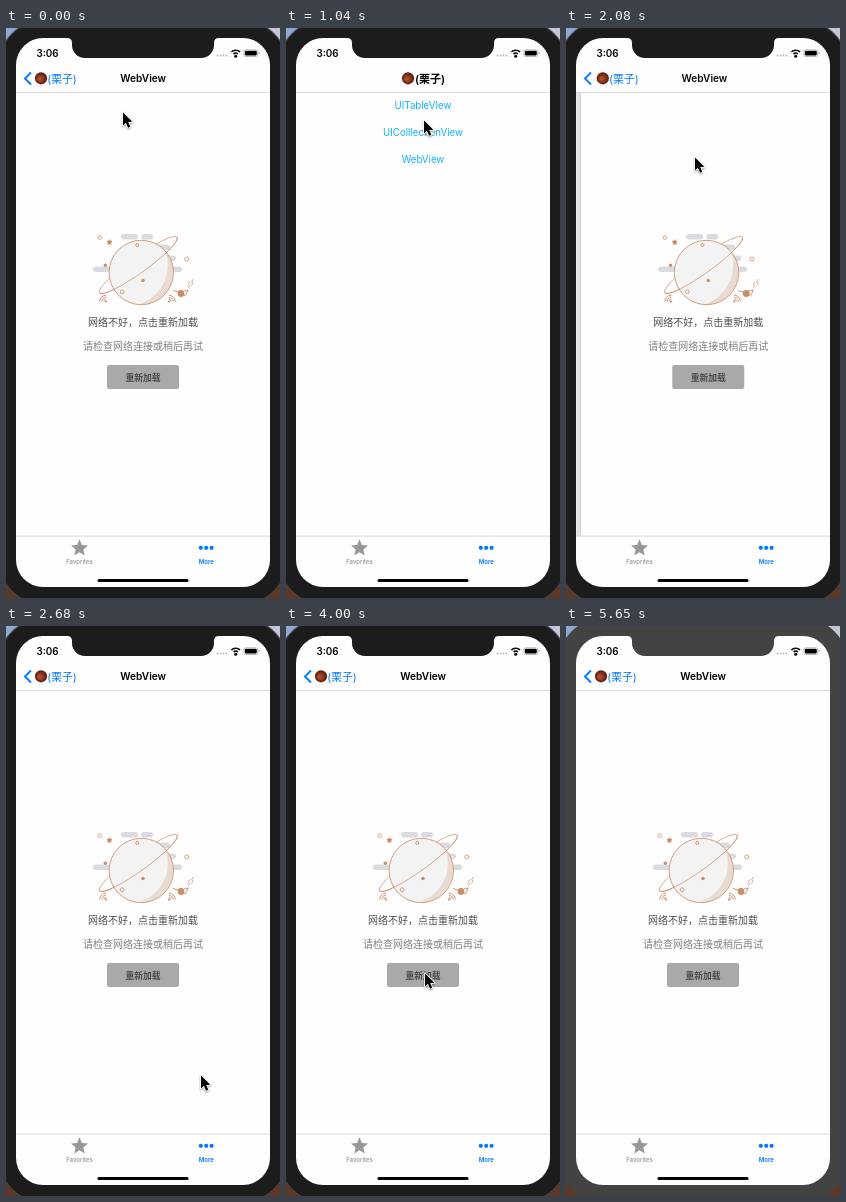
An HTML page with a canvas for the animation above (5750 ms loop, 274 px wide and 570 px high).

```html
<!DOCTYPE html>
<html lang="zh">
<head>
<meta charset="utf-8">
<title>WebView navigation</title>
<style>
html, body { margin: 0; width: 274px; height: 570px; overflow: hidden; background: #1c1c1c; }
canvas { display: block; width: 274px; height: 570px; }
</style>
</head>
<body>
<canvas id="stage"></canvas>
<script>
const W = 274, H = 570, LOOP = 5750, STEP = 148.1;
const LEFT = 10, RIGHT = 264, TOP = 10, BOTTOM = 559, WIDE = RIGHT - LEFT;
const NAV = 64, TAB = 508;
const POP = 620, PUSH = 1760, POINTER_GONE = 5190, UNFOCUS = 5650;
const BLUE = '#007aff', COPPER = '#c98d68', CLOUD = '#dadbde', LINE = '#dadadb';
const CJK = '"Noto Sans CJK SC", "Noto Sans CJK", sans-serif';
const SANS = 'Inter, ' + CJK;

const canvas = document.getElementById('stage');
const ctx = canvas.getContext('2d');
const dpr = window.devicePixelRatio || 1;
canvas.width = W * dpr;
canvas.height = H * dpr;

// Pointer stops: time, x, y
const PATH = [
  [0, 117, 84], [440, 36, 51], [POP, 36, 51], [1036, 138, 92], [1332, 129, 128], [2080, 129, 129],
  [2665, 195, 449], [3110, 235, 531], [3998, 139, 347]
];

const mix = (a, b, k) => a + (b - a) * k;
const smooth = k => k * k * (3 - 2 * k);

function spring(ms) {
  const x = Math.max(0, ms) * 0.0185;
  return 1 - (1 + x) * Math.exp(-x);
}

// 1 = detail page fully shown, 0 = list fully shown
function detailShown(t) {
  const p = t < PUSH ? 1 - spring(t - POP) : spring(t - PUSH);
  return p < 0.01 ? 0 : p > 0.99 ? 1 : p;
}

function pointerAt(t) {
  const i = PATH.findIndex(stop => stop[0] > t);
  if (i < 0) return PATH.at(-1).slice(1);
  const [t0, x0, y0] = PATH[i - 1], [t1, x1, y1] = PATH[i];
  const k = smooth((t - t0) / (t1 - t0));
  return [mix(x0, x1, k), mix(y0, y1, k)];
}

function text(str, x, y, size, color, weight = 400, align = 'center', family = SANS) {
  ctx.font = `${weight} ${size}px ${family}`;
  ctx.textAlign = align;
  ctx.fillStyle = color;
  ctx.fillText(str, x, y);
}

function box(x, y, w, h, r, color) {
  ctx.beginPath();
  ctx.roundRect(x, y, w, h, r);
  ctx.fillStyle = color;
  ctx.fill();
}

function stroke(color, width) {
  ctx.strokeStyle = color;
  ctx.lineWidth = width;
  ctx.stroke();
}

function dot(x, y, r, color) {
  ctx.beginPath();
  ctx.arc(x, y, r, 0, 7);
  ctx.fillStyle = color;
  ctx.fill();
}

function ring(x, y, r) {
  ctx.beginPath();
  ctx.arc(x, y, r, 0, 7);
  stroke(COPPER, 0.8);
}

function line(points, color, width) {
  ctx.beginPath();
  points.forEach(p => ctx.lineTo(...p));
  stroke(color, width);
}

function star(x, y, r, inner, color) {
  ctx.beginPath();
  for (let i = 0; i < 10; i++) {
    const a = -Math.PI / 2 + i * Math.PI / 5, d = i % 2 ? r * inner : r;
    ctx.lineTo(x + d * Math.cos(a), y + d * Math.sin(a));
  }
  ctx.closePath();
  ctx.fillStyle = color;
  ctx.fill();
}

// Dot with arcs opening towards an angle
function signal(x, y, angle, gap, arcs, color, width) {
  dot(x, y, gap / 2, color);
  for (let i = 1; i <= arcs; i++) {
    ctx.beginPath();
    ctx.arc(x, y, i * gap, angle - 0.8, angle + 0.8);
    stroke(color, width);
  }
}

function withAlpha(alpha, paint) {
  ctx.save();
  ctx.globalAlpha = alpha;
  paint();
  ctx.restore();
}

function gradient(x0, y0, x1, y1, ...colors) {
  const g = ctx.createLinearGradient(x0, y0, x1, y1);
  colors.forEach((c, i) => g.addColorStop(i / (colors.length - 1), c));
  return g;
}

function phone(bezel) {
  ctx.fillStyle = gradient(0, 0, W, 0, '#8fa7d4', '#c6c6d8');
  ctx.fillRect(0, 0, W, H / 2);
  ctx.fillStyle = '#5f3823';
  ctx.fillRect(0, H / 2, W, H / 2);
  box(-7, -7, W + 14, H + 13, 44, bezel);
  stroke('#454547', 1.2);
  box(LEFT, TOP, WIDE, BOTTOM - TOP, 27, '#fefefe');
}

function notch(bezel) {
  ctx.beginPath();
  ctx.moveTo(61, 9);
  ctx.lineTo(61, 10);
  ctx.quadraticCurveTo(66, 10, 66, 15);
  ctx.arcTo(66, 30, 78, 30, 13);
  ctx.arcTo(208, 30, 208, 15, 13);
  ctx.lineTo(208, 15);
  ctx.quadraticCurveTo(208, 10, 213, 10);
  ctx.lineTo(213, 9);
  ctx.fillStyle = bezel;
  ctx.fill();
}

function statusBar() {
  text('3:06', 41.5, 29, 9.8, '#000', 600);
  for (let i = 0; i < 4; i++) dot(211.5 + i * 3, 27.5, 0.9, '#b9b9b9');
  signal(229.7, 28.2, -Math.PI / 2, 3, 2, '#000', 1.6);
  box(237.5, 21.5, 14.6, 7.2, 2.2, '#a0a0a0');
  box(238.1, 22.1, 13.4, 6, 1.7, '#fff');
  box(238.8, 22.8, 12, 4.6, 1.1, '#000');
  box(252.6, 23.9, 1, 2.4, 0.5, '#9a9a9a');
}

function chestnut(x, y) {
  const g = ctx.createRadialGradient(x - 1.5, y + 1, 0.5, x, y, 6.4);
  ['#b4512f', '#8a351d', '#481a10'].forEach((c, i) => g.addColorStop(i / 2, c));
  dot(x, y, 6.1, g);
}

function navBar(p) {
  const back = -87 * p;
  withAlpha(p * p, () => {
    line([[25, 44.5], [19, 50.5], [25, 56.5]], BLUE, 1.9);
    text('WebView', 137.2 + 60 * (1 - p), 54.3, 10.1, '#000', 600);
    text('(栗子)', 128.3 + back, 54.5, 10.8, BLUE, 400, 'left');
  });
  withAlpha(1 - p * p, () => text('(栗子)', 129 + back, 54.5, 11, '#000', 600, 'left'));
  chestnut(122 + back, 50.3);
  ctx.fillStyle = LINE;
  ctx.fillRect(LEFT, NAV, WIDE, 1);
}

function listPage() {
  ['UITableVIew', 'UIColllectionView', 'WebView'].forEach((name, i) =>
    text(name, 137, 81 + i * 27, 9.7, '#0fb0fb'));
}

function orbit(to) {
  ctx.beginPath();
  ctx.ellipse(132.3, 237, 47.8, 8, -0.622, 0, to);
  stroke(COPPER, 0.7);
}

function planet() {
  const x = 135.3, y = 244.5, r = 32.2;
  for (let i = 0; i < 3; i++) box(150 + i * 4, 216.5 + i * 11, 14 + i * 2, 5.5, 2.7, CLOUD);
  box(115, 206, 17, 5.5, 2.7, CLOUD);
  box(135, 206, 12, 5.5, 2.7, CLOUD);
  box(87, 238.5, 20, 5.5, 2.7, CLOUD);
  orbit(7);
  dot(x, y, r, '#e9dbd2');
  ctx.save();
  ctx.clip();
  dot(121, 237, 41, '#f3f3f3');
  ctx.restore();
  ring(x, y, r);
  orbit(Math.PI);
}

function debris() {
  ring(93.6, 209.6, 1.8);
  ring(180.7, 231, 2);
  ring(131.2, 217, 1.5);
  ring(116.2, 263.8, 1.9);
  dot(99.3, 237.3, 1.7, COPPER);
  dot(137, 252.5, 1.7, COPPER);
  star(103.5, 214.3, 3.1, 0.6, COPPER);
  signal(100, 273.5, -2.35, 2.1, 3, COPPER, 0.9);
  signal(163, 273.5, -0.8, 2.1, 3, COPPER, 0.9);

  // Broken satellite with two sparks
  dot(175, 265.5, 3.4, COPPER);
  line([[167, 262.5], [172, 264], [180, 268]], COPPER, 0.9);
  line([[178, 263], [182, 262], [180, 267]], COPPER, 0.9);
  for (const [x, y] of [[182, 260], [185.5, 257.5]])
    line([[x, y], [x + 1.5, y - 2.5], [x, y - 3.5], [x + 2, y - 6.5]], COPPER, 0.7);
}

function errorPage() {
  planet();
  debris();
  text('网络不好，点击重新加载', 137, 297.8, 10, '#4c4c4c', 400, 'center', CJK);
  text('请检查网络连接或稍后再试', 137, 321.8, 10, '#808080', 400, 'center', CJK);
  box(101, 337, 72, 24, 2, '#a9a9a9');
  text('重新加载', 137, 352.5, 8.8, '#4b4b4b', 600, 'center', CJK);
}

function pages(p) {
  const x = WIDE * (1 - p), edge = LEFT + x, tall = TAB - NAV;
  ctx.save();
  ctx.beginPath();
  ctx.rect(LEFT, NAV, WIDE, tall);
  ctx.clip();
  if (p < 1) {
    ctx.save();
    ctx.translate(-0.3 * WIDE * p, 0);
    listPage();
    ctx.restore();
  }
  if (p > 0) {
    ctx.fillStyle = `rgba(0,0,0,${0.08 * p})`;
    ctx.fillRect(LEFT, NAV, x, tall);
    ctx.fillStyle = gradient(edge - 5, 0, edge, 0, 'rgba(0,0,0,0)', `rgba(0,0,0,${mix(0.22, 0.08, p)})`);
    ctx.fillRect(edge - 5, NAV, 5, tall);
    ctx.fillStyle = '#fefefe';
    ctx.fillRect(edge, NAV, WIDE, tall);
    ctx.translate(x, 0);
    errorPage();
  }
  ctx.restore();
}

function tabBar() {
  ctx.fillStyle = LINE;
  ctx.fillRect(LEFT, TAB - 0.4, WIDE, 1);
  star(73.5, 520.3, 9, 0.45, '#979797');
  text('Favorites', 73.5, 536.2, 6.1, '#929292', 500);
  for (let i = -1; i <= 1; i++) dot(200.2 + i * 5.4, 519.8, 2.1, BLUE);
  text('More', 200.3, 536.2, 6.1, BLUE, 600);
  box(91.5, 551, 91, 3, 1.5, '#000');
}

function pointer(x, y) {
  ctx.save();
  ctx.translate(x, y + 0.4);
  ctx.scale(0.92, 0.92);
  ctx.beginPath();
  [[0, 0], [0, 14.2], [3.2, 11.2], [5.5, 16.6], [7.9, 15.6], [5.7, 10.3], [10.2, 10.2]]
    .forEach(p => ctx.lineTo(...p));
  ctx.closePath();
  ctx.lineJoin = 'round';
  ctx.shadowColor = 'rgba(0,0,0,0.4)';
  ctx.shadowBlur = 2 * dpr;
  ctx.shadowOffsetY = dpr;
  stroke('#fff', 1.9);
  ctx.shadowColor = 'transparent';
  ctx.fillStyle = '#000';
  ctx.fill();
  ctx.restore();
}

function draw(t) {
  // The screen refreshes in even steps
  const tick = Math.floor((t + 4) / STEP) * STEP;
  const p = detailShown(tick), bezel = t < UNFOCUS ? '#1c1c1c' : '#434343';
  ctx.setTransform(dpr, 0, 0, dpr, 0, 0);
  phone(bezel);
  notch(bezel);
  statusBar();
  pages(p);
  navBar(p);
  tabBar();
  if (t < POINTER_GONE) pointer(...pointerAt(tick));
}

function frame(now) {
  draw(now % LOOP);
  requestAnimationFrame(frame);
}
draw(0);
requestAnimationFrame(frame);
</script>
</body>
</html>
```
